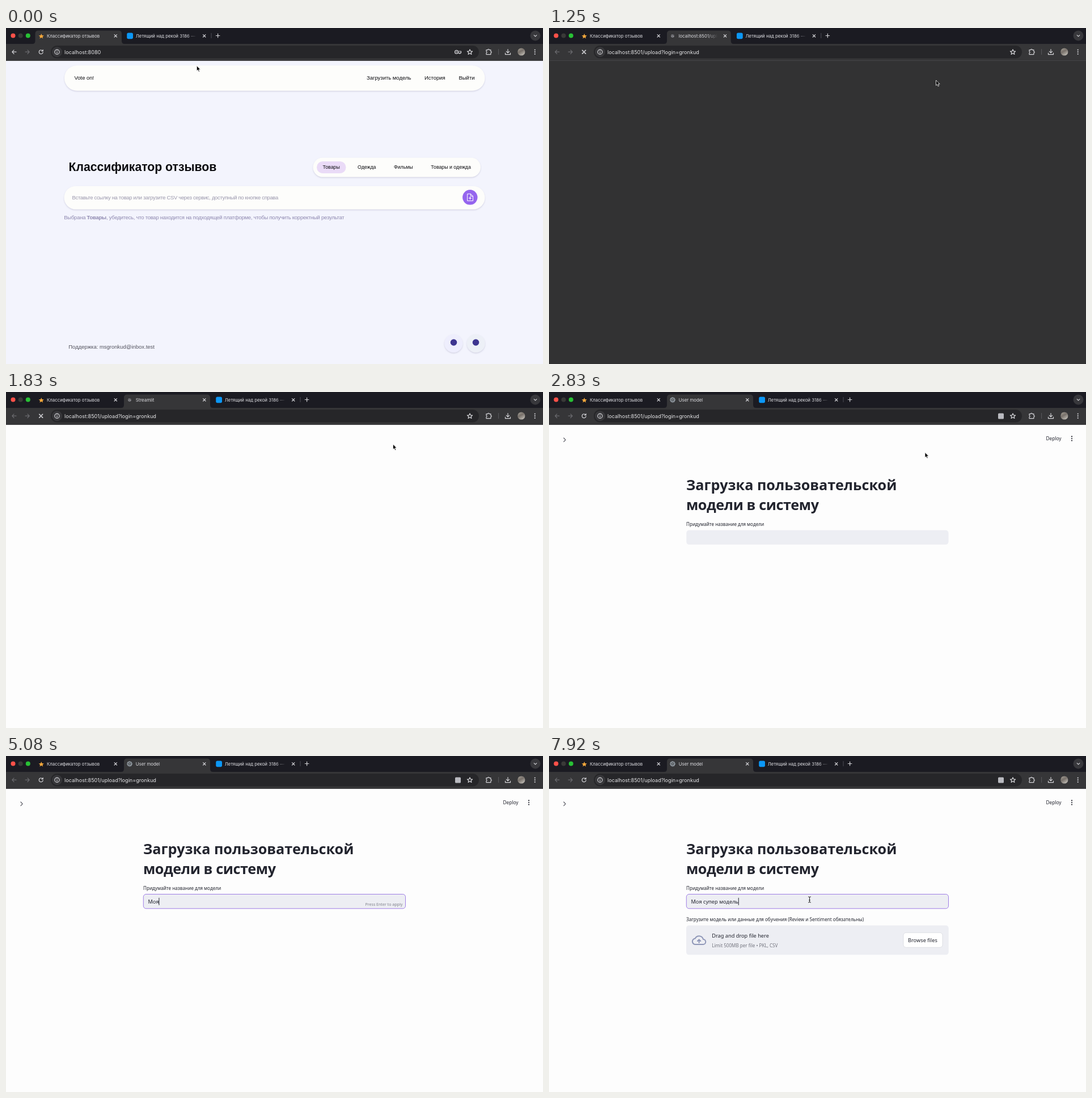
An HTML page that plays this animation: 947x592 px, repeating every 8000 ms.

```html
<!DOCTYPE html>
<html lang="ru">
<head>
<meta charset="utf-8">
<title>Классификатор отзывов</title>
<style>
  html, body { margin: 0; width: 100%; height: 100%; overflow: hidden; background: #1b1b22; }
  svg { display: block; width: 100%; height: 100%; }
  text { white-space: pre; }
  .ui { font: 7.85px Inter, sans-serif; fill: #dedee2; }
  .url { font: 9.12px Inter, sans-serif; fill: #e6e6e8; }
  .page { font: 9.47px "Liberation Sans", Arial, sans-serif; fill: #0b0b0f; }
  .pill { font-size: 8.8px; }
  .app { font: 500 8.1px "Noto Sans", "Open Sans", sans-serif; fill: #22242e; }
  .body { font-size: 9.23px; }
  .line { fill: none; stroke: #d4d4d8; stroke-width: 1.2; stroke-linecap: round; stroke-linejoin: round; }
  .dim { stroke: #6c6c70; }
  .card { fill: #fdfdfb; filter: url(#soft); }
</style>
</head>
<body>
<svg viewBox="0 0 947 592" xmlns="http://www.w3.org/2000/svg">
  <defs>
    <filter id="soft" x="-10%" y="-20%" width="120%" height="150%">
      <feDropShadow dx="0" dy="1.2" stdDeviation="1" flood-color="#6a6690" flood-opacity=".28"/>
    </filter>
    <linearGradient id="fade">
      <stop offset=".86" stop-color="#fff"/><stop offset="1" stop-color="#000"/>
    </linearGradient>
    <linearGradient id="photo" x2=".6" y2="1">
      <stop stop-color="#a9a49a"/><stop offset=".5" stop-color="#77706a"/><stop offset="1" stop-color="#b9b5ae"/>
    </linearGradient>
    <mask id="filmMask" maskUnits="userSpaceOnUse" x="200" y="0" width="150" height="28">
      <rect x="200" width="137" height="28" fill="url(#fade)"/>
    </mask>
    <mask id="newMask" maskUnits="userSpaceOnUse" x="100" y="0" width="250" height="28">
      <rect id="newFade" x="200" width="137" height="28" fill="url(#fade)"/>
    </mask>
    <path id="x" class="line" d="M-2.2-2.2 2.2 2.2M2.2-2.2-2.2 2.2"/>
    <path id="star" d="M0-4.6 1.3-1.6 4.6-1.4 2.1.8 2.9 4 0 2.2-2.9 4-2.1.8-4.6-1.4-1.3-1.6Z"/>
  </defs>

  <!-- classifier page -->
  <g id="home" class="page">
    <rect y="57" width="947" height="535" fill="#f3f4fd"/>
    <rect class="card" x="103" y="66" width="741.5" height="44.5" rx="22.2"/>
    <text x="120.5" y="91.4">Vote on!</text>
    <text x="636" y="91.4">Загрузить модель</text>
    <text x="738" y="91.4">История</text>
    <text x="798.5" y="91.4">Выйти</text>
    <text x="110.5" y="251.8" font-size="21.2" font-weight="700">Классификатор отзывов</text>
    <rect class="card" x="541.5" y="228.5" width="295.5" height="34" rx="17"/>
    <rect x="548" y="235" width="51.5" height="21" rx="10.5" fill="#eadbf7"/>
    <g class="pill">
      <text x="558.5" y="248.4">Товары</text>
      <text x="620" y="248.4">Одежда</text>
      <text x="684" y="248.4">Фильмы</text>
      <text x="749.3" y="248.4">Товары и одежда</text>
    </g>
    <rect class="card" x="102.5" y="278.5" width="742" height="41" rx="20.5"/>
    <text x="116.5" y="302" fill="#9a97ad" letter-spacing="-.32">Вставьте ссылку на товар или загрузите CSV через сервис, доступный по кнопке справа</text>
    <circle cx="818.3" cy="298.3" r="13.2" fill="#9565ee"/>
    <path class="line" style="stroke:#fff;stroke-width:1" d="M814 292.3h5.5l4 4v8.2h-9.5ZM819.5 292.3v4h4M818.5 297.6v4.4M816.3 299.8h4.4"/>
    <text x="102.3" y="337.4" fill="#8f89b0" letter-spacing="-.24">Выбрана <tspan font-weight="700">Товары</tspan>, убедитесь, что товар находится на подходящей платформе, чтобы получить корректный результат</text>
    <text x="110.3" y="565.2" fill="#54545e">Поддержка: msgronkud@inbox.test</text>
    <circle class="card" cx="789.3" cy="555.8" r="16" style="fill:#eeeefd"/>
    <circle class="card" cx="828.7" cy="555.8" r="16" style="fill:#edf0f7"/>
    <circle cx="789.5" cy="554" r="5.8" fill="#3d3590"/>
    <circle cx="828.5" cy="554" r="5.8" fill="#3d3590"/>
  </g>

  <rect id="blank" y="57" width="947" height="535"/>

  <!-- upload app -->
  <g id="app" class="app">
    <path class="line" style="stroke:#55565f" d="M26 81 29.2 84.3 26 87.6"/>
    <text x="876.5" y="84.8" font-size="8.3">Deploy</text>
    <g><circle cx="922" cy="78.4" r="1.1"/><circle cx="922" cy="82" r="1.1"/><circle cx="922" cy="85.6" r="1.1"/></g>
    <g id="form">
      <g font-size="25.2" font-weight="700">
        <text x="242" y="172.6">Загрузка пользовательской</text>
        <text x="242" y="207.6" letter-spacing="-.4">модели в систему</text>
      </g>
      <text x="242" y="235.9">Придумайте название для модели</text>
      <rect id="input" x="242.3" y="243.5" width="462.2" height="25.3" rx="4.7" fill="#edeef3" stroke-width=".9"/>
      <text id="typed" class="body" x="250.5" y="259.8"></text>
      <text id="hint" x="633.5" y="264.4" font-size="7.05" font-weight="400" fill="#7f808b">Press Enter to apply</text>
      <rect id="caret" y="249.8" width="1" height="13"/>
    </g>
    <g id="upload">
      <text x="242" y="290.9">Загрузите модель или данные для обучения (Review и Sentiment обязательны)</text>
      <rect x="242" y="298.5" width="462.7" height="51.8" rx="4.7" fill="#edeef3"/>
      <path class="line" style="stroke:#8f97b8;stroke-width:2" d="M258.5 332h13a4.5 4.5 0 0 0 .5-9 7.6 7.6 0 0 0-14.3-1.4 5.2 5.2 0 0 0 .8 10.4ZM264.6 329v-5M262 326l2.6-2.6 2.6 2.6"/>
      <text class="body" x="287.2" y="320.3">Drag and drop file here</text>
      <text x="287.2" y="337.2" font-weight="400" fill="#74757f">Limit 500MB per file • PKL, CSV</text>
      <rect x="625" y="311.3" width="69" height="26" rx="4.7" fill="#fff" stroke="#d5d6dc" stroke-width=".7"/>
      <text class="body" x="633" y="327.6">Browse files</text>
    </g>
  </g>

  <!-- browser frame -->
  <rect width="947" height="28" fill="#1b1b22"/>
  <rect y="28" width="947" height="30" fill="#363638"/>
  <rect y="57" width="947" height="1" fill="#444446"/>
  <circle cx="12.5" cy="13.5" r="4" fill="#fe5149"/>
  <circle cx="25.7" cy="13.5" r="4" fill="#3a3a38"/>
  <circle cx="38.8" cy="13.5" r="4" fill="#28c135"/>
  <path id="tabShape" fill="#363638"/>
  <g class="ui">
    <use href="#star" x="62.3" y="14.6" fill="#f3a73c"/>
    <text x="72" y="16.6">Классификатор отзывов</text>
    <use href="#x" x="193.3" y="13.8"/>
    <g id="newTab">
      <g mask="url(#newMask)"><text id="newTitle" x="228.7" y="16.6"></text></g>
      <g id="globe">
        <circle cx="218" cy="14" r="2.8" fill="#8e8e93"/>
        <path class="line" style="stroke-width:.8;stroke:#303034" d="M216 13.2q2 .2 2.2 2M218 11.6q.3 2 2.4 1.8"/>
      </g>
      <g id="gear" fill="none" stroke="#a9b4bd">
        <circle cx="218" cy="13.8" r="4.1" stroke-width="1.2" stroke-dasharray="1.1 .51"/>
        <circle cx="218" cy="13.8" r="3.1" stroke-width="1"/>
        <circle cx="218" cy="13.8" r="1.1" stroke-width=".9"/>
      </g>
      <use id="newClose" href="#x" y="13.8"/>
    </g>
    <g id="film">
      <rect x="213.2" y="8.4" width="10.8" height="10.8" rx="2.6" fill="#0c97f5"/>
      <g mask="url(#filmMask)"><text x="228.7" y="16.6">Летящий над рекой 3186 — смотреть</text></g>
      <use href="#x" x="349.7" y="13.8"/>
      <path d="M362 9v9" stroke="#4c4c54"/>
      <path class="line" d="M370.3 13.5h6.6M373.6 10.2v6.6"/>
    </g>
  </g>
  <circle cx="933.5" cy="13.5" r="9" fill="#38383c"/>
  <path class="line" d="M931.2 12.6 933.5 14.9 935.8 12.6"/>

  <rect x="79" y="31" width="755" height="22.5" rx="11.2" fill="#262629"/>
  <circle cx="90" cy="42.2" r="9" fill="#37373a"/>
  <circle class="line" cx="90" cy="42.2" r="4.1"/>
  <path class="line" d="M90 42v2.2M90 40.1v.1"/>
  <text id="url" class="url" x="103" y="45.5"></text>
  <path id="back" class="line" d="M18 42.2h-7M14 38.9 10.8 42.2 14 45.5"/>
  <path class="line dim" d="M34.2 42.2h7M38 38.9 41.2 42.2 38 45.5"/>
  <path id="reload" class="line" d="M64.6 40.2a3.5 3.5 0 1 0 .6 2.6M65.2 38.3v2.4h-2.4"/>
  <use id="stop" href="#x" transform="translate(61.7 42.2) scale(1.35)"/>
  <g id="key" class="line"><circle cx="794.4" cy="42.3" r="2.9"/><circle cx="794.4" cy="42.3" r=".4"/><path d="M797.5 41h5v2.8h-1.4v1h-2v-1h-1.8"/></g>
  <rect id="translate" x="792" y="37.5" width="10" height="10" rx="1.5" fill="#b9bac0"/>
  <use href="#star" x="818" y="42.4" class="line"/>
  <path class="line" d="M847 38.6h2.6a1.3 1.3 0 0 1 2.6 0h2.7v2.7a1.3 1.3 0 0 1 0 2.6v2.7H847v-2.6a1.4 1.4 0 0 0 0-2.7Z"/>
  <path d="M868.6 37v10" stroke="#5a5a5e"/>
  <path class="line" d="M885 37.5v6M882.3 41.2 885 43.9 887.7 41.2M880.5 44.2v2.5h9v-2.5"/>
  <circle cx="908.8" cy="42" r="6.6" fill="url(#photo)"/>
  <g fill="#d4d4d8"><circle cx="932.7" cy="38.6" r="1.1"/><circle cx="932.7" cy="42.2" r="1.1"/><circle cx="932.7" cy="45.8" r="1.1"/></g>

  <path id="arrow" d="M0 0v9.2L2.1 7.3 3.6 10.7 5.2 10 3.7 6.7H6.6Z" fill="#000" stroke="#fff" stroke-width=".8"/>
  <path id="beam" class="line" style="stroke:#222;stroke-width:1" d="M-2-5q2 0 2 1 0-1 2-1M0-4V4M-2 5q2 0 2-1 0 1 2 1M-1 1h2"/>
</svg>
<script>
const LOOP = 8000;
const OPEN = 1250, PAINT = 1830, SHELL = 2330, FORM = 2580, FOCUS = 3500;
const TYPE = 4500, KEY = 195, ENTER = 7660, BACK = 7740;
const NAME = 'Моя супер модель';
const TAB = 157;

const el = {};
document.querySelectorAll('[id]').forEach(n => el[n.id] = n);
const show = (n, on) => n.style.display = on ? '' : 'none';
const set = (n, k, v) => n.setAttribute(k, v);
const move = (n, x, y) => set(n, 'transform', `translate(${x} ${y})`);
const label = (n, s) => { if (n.textContent !== s) n.textContent = s; };
const ramp = (t, a, b) => Math.min(1, Math.max(0, (t - a) / (b - a)));
const smooth = p => p * p * (3 - 2 * p);

function tabPath(l, r) {
  return `M${l - 5} 28q5 0 5-5V10q0-5.5 5.5-5.5H${r - 5.5}q5.5 0 5.5 5.5V23q0 5 5 5Z`;
}

// Pointer stops: start time, end time, destination
const moves = [[150, 1050, 682.5, 92], [2700, 3400, 467.5, 251], [BACK, 7900, 459.5, 253]];
function pointer(t) {
  let x = 336.3, y = 66.5;
  for (const [a, b, tx, ty] of moves) {
    const p = smooth(ramp(t, a, b));
    x += (tx - x) * p;
    y += (ty - y) * p;
  }
  return [x, y];
}

function drawFrame(t) {
  const opened = t >= OPEN, painted = t >= PAINT, ready = t >= FORM;
  const left = 1 - ramp(t, OPEN - 80, OPEN + 80);
  const w = opened ? TAB * (1 - left * left) : 0;

  set(el.tabShape, 'd', opened ? tabPath(208, 203 + w) : tabPath(51.5, 204));
  show(el.newTab, opened);
  move(el.film, w, 0);
  set(el.newFade, 'x', 200 + w - TAB);
  set(el.newClose, 'x', 192.8 + w);
  label(el.newTitle, ready ? 'User model' : painted ? 'Streamlit' : 'localhost:8501/upload');
  show(el.globe, !ready);
  show(el.gear, ready);

  label(el.url, opened ? 'localhost:8501/upload?login=gronkud' : 'localhost:8080');
  set(el.back, 'class', opened ? 'line dim' : 'line');
  show(el.reload, !opened || t >= SHELL);
  show(el.stop, opened && t < SHELL);
  show(el.key, !opened);
  show(el.translate, ready);

  show(el.home, !opened);
  show(el.blank, opened);
  set(el.blank, 'fill', painted ? '#fdfdfd' : '#323233');
  show(el.app, t >= SHELL);
  show(el.form, ready);
  show(el.upload, t >= ENTER);

  const count = t < TYPE ? 0 : Math.min(NAME.length, 1 + Math.floor((t - TYPE) / KEY));
  const lastKey = count ? TYPE + (count - 1) * KEY : FOCUS;
  label(el.typed, NAME.slice(0, count));
  show(el.hint, count > 0 && t < ENTER);
  set(el.input, 'stroke', t >= FOCUS ? '#9570e4' : 'none');
  show(el.caret, t >= FOCUS && (t - lastKey) % 1000 < 510);
  if (t >= FOCUS) set(el.caret, 'x', 250.3 + (count ? el.typed.getComputedTextLength() : 0));

  const [x, y] = pointer(t);
  const over = ready && x > 242 && x < 705 && y > 243 && y < 269;
  const hidden = t >= TYPE && t < BACK;
  show(el.arrow, !over && !hidden);
  show(el.beam, over && !hidden);
  move(el.arrow, x, y);
  move(el.beam, x, y);
}

let start;
function tick(now) {
  start ??= now;
  drawFrame((now - start) % LOOP);
  requestAnimationFrame(tick);
}
drawFrame(0);
requestAnimationFrame(tick);
</script>
</body>
</html>
```
